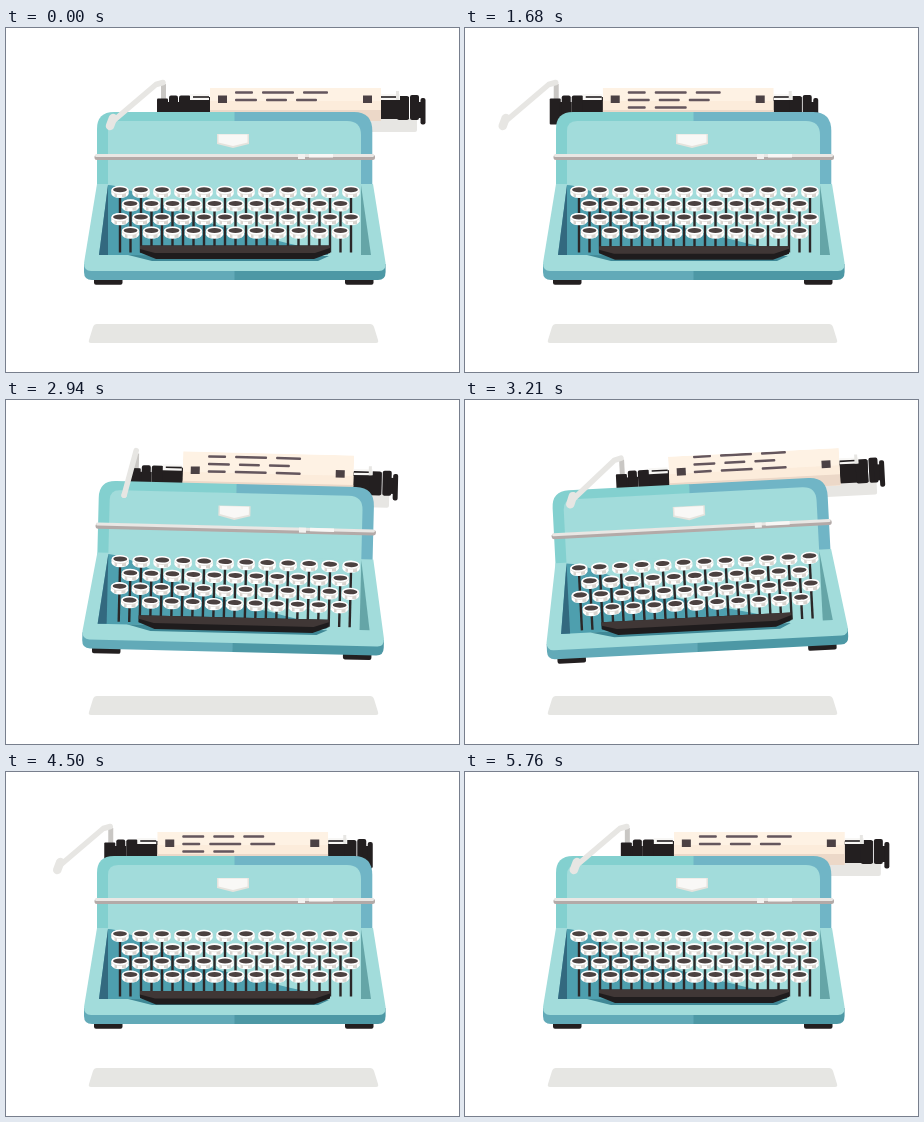
Write an HTML page with a canvas that moves like this. It is 453 px wide and 344 px high and loops after 5.91 s.

```html
<!DOCTYPE html>
<html lang="en">
<head>
<meta charset="utf-8">
<title>Typewriter</title>
<style>
html, body { margin: 0; width: 100%; height: 100%; overflow: hidden; background: #fff; }
canvas { display: block; width: 453px; height: 344px; }
</style>
</head>
<body>
<canvas id="stage" width="453" height="344"></canvas>
<script>
const c = document.getElementById('stage').getContext('2d');
const LOOP = 5910, STEP = 4.85, HOME = 204, STRIKE = 229;
const INK = '#231f20', LIGHT = '#a2dcdb', SILVER = '#e7e6e3';

// Two typed lines; words are measured from the paper's left edge
const LINES = [
  { start: 210, end: 2580, back: 2655, spend: 600, keys: 19, ease: 1.3, words: [[25, 43], [52, 84], [93, 118]] },
  { start: 3255, end: 5220, back: 5225, spend: 535, keys: 17, ease: 1, words: [[25, 47], [56, 77], [86, 107]] }
];

const mix = (a, b, k) => a + (b - a) * k;
const clamp = v => Math.max(0, Math.min(1, v));

function box(color, x, y, w, h, r = 0) {
  c.fillStyle = color;
  c.beginPath();
  c.roundRect(x, y, w, h, r);
  c.fill();
}
function shape(color, d) {
  c.fillStyle = color;
  c.fill(new Path2D(d));
}
function line(color, width, ...p) {
  c.strokeStyle = color;
  c.lineWidth = width;
  c.lineCap = c.lineJoin = 'round';
  c.beginPath();
  for (let i = 0; i < p.length; i += 2) c.lineTo(p[i], p[i + 1]);
  c.stroke();
}
function oval(color, x, y, rx, ry) {
  c.fillStyle = color;
  c.beginPath();
  c.ellipse(x, y, rx, ry, 0, 0, 7);
  c.fill();
}

function pose(t) {
  const index = t < LINES[1].start ? 0 : 1, l = LINES[index];

  // typing: one eased hop per key
  const n = l.keys * (1 - (1 - clamp((t - l.start) / (l.end - l.start))) ** l.ease);
  const f = n % 1;
  const head = HOME - STEP * (n - f + f * f * (3 - 2 * f));
  const typing = t > l.start && t < l.end;
  const reach = STRIKE - head;
  const space = !l.words.some(([a, b]) => reach >= a && reach <= b);

  // carriage return: swing the lever, feed the paper, slide back, rock the machine
  const u = clamp((t - l.back) / l.spend);
  const pull = clamp(u * 5);
  return {
    x: mix(head, HOME + STEP, clamp(u / .74)),
    row: index + 2,
    limit: t < l.end ? reach : 171,
    space,
    key: (Math.round(n) * 33 + 32) % 47,
    press: typing ? clamp(1.1 - 2 * Math.abs((f + .55) % 1 - .5)) : 0,
    bar: typing && !space ? clamp(1 - 4 * Math.abs(f - .65)) : 0,
    scroll: index + pull,
    rise: pull * clamp((1 - u) * 8),
    lever: Math.min(pull, clamp((.9 - u) * 5)),
    tilt: 4 * Math.sin(2 * Math.PI * clamp((u - .445) / .555))
  };
}

function paper(p) {
  const top = 60 - 7.5 * p.rise;
  c.save();
  c.beginPath();
  c.rect(0, top, 171, 93 - top);
  c.clip();
  box('#fef2e4', 0, top, 171, 41);
  box('#fcecdb', 0, 73, 171, 20);
  box('#ecd8c8', 0, 82, 171, 12);
  for (const x of [8, 153]) box('#4b4144', x, 67.5, 9, 7.5);
  for (let j = Math.floor(p.scroll) - 1; j <= p.row; j++) {
    const y = 64.6 + 7.5 * (j - p.scroll);
    const limit = j < p.row ? 171 : p.limit;
    for (const [a, b] of LINES[j & 1].words)
      if (limit > a) box('#64565d', a, y - 1.25, Math.min(b, limit) - a, 2.5, 1);
  }
  c.restore();
}

function carriage(p) {
  c.save();
  c.translate(p.x, 0);
  box(SILVER, -37, 90, 244, 14, 2);
  box('#c9c7c4', -49, 56, 5, 17);
  // left knobs
  box(INK, -53, 70.5, 11, 26, 1);
  box(INK, -43, 74, 12, 18);
  box(INK, -41, 67.5, 9, 31, 2);
  box(INK, -31, 67.5, 12, 24, 2);
  box(INK, -20, 69, 22, 22);
  // right knobs
  box(INK, 170, 69, 29, 22);
  box(INK, 187, 68, 12, 24, 2);
  box(INK, 200, 67, 9, 25, 2);
  box(INK, 205, 74, 8, 16);
  box(INK, 210.5, 70, 5, 26.5, 2);
  // paper rods
  for (const x of [-20, 171]) {
    box('#f8f7f5', x, 66, 19, 6);
    box(INK, x < 0 ? x + 3 : x, 68.2, 16, 1.6);
  }
  box(SILVER, 186, 63, 3, 9);
  paper(p);
  c.restore();
  if (p.bar) shape('#3a3033', `M214 86L228 ${86 - 8 * p.bar}L242 86Z`);
}

function lever({ x, lever: k }) {
  const ex = x + mix(-98, -58, k), ey = mix(94, 98, k);
  line(SILVER, 5.5, x - 47, mix(54.5, 53, k), x + mix(-54, -47, k), mix(56.5, 53, k), ex, ey);
  line(SILVER, mix(8.5, 5.5, k), ex + 1 - k, ey - 4 + 4 * k, ex - 2 + 2 * k, ey + 4 - 4 * k);
}

function body() {
  for (const x of [88, 339]) box(INK, x, 248, 28.5, 8.7, 2);
  shape('#83d0cf', 'M91 160V101Q91 84 108 84H229V160Z');
  shape('#70b5c6', 'M228.5 84H348Q366.3 84 366.3 103V160H228.5Z');
  shape(LIGHT, 'M102 160V103Q102 93 112 93H341Q355 93 355 107V160Z');
  // base front and rim
  shape('#62aab8', 'M78 236H229V252H86Q78 252 78 244Z');
  shape('#4d98a5', 'M228.5 236H379.6V244Q379.6 252 372 252H228.5Z');
  shape(LIGHT, 'M91 156H367L379.6 235Q380 243 373 243H85Q78 243 78 235Z');
  // key well
  shape('#4e9fae', 'M102 157C135 160 165 190 265 211Q300 220 322 223V227H93Z');
  shape('#33697f', 'M102 157V227H93Z');
  shape('#65a5a7', 'M355 157L365 227H355Z');
  // bar
  box('#b3aaa8', 88.5, 126.5, 280.5, 5.5, 2.5);
  box('#e9e7e4', 89, 126, 279, 3, 1.5);
  box('#f3f1ef', 292, 126, 7, 5);
  box('#f8f7f5', 303, 126, 24, 3.5);
  // blank plate
  shape('#e5e3dd', 'M211 106H243V116L227 120L211 116Z');
  shape('#f9f8f6', 'M212.5 106.5H241.5V114.5L227 118L212.5 114.5Z');
}

function keys(p) {
  for (let i = 0; i < 23; i++) {
    const top = i % 2 ? 178 : 165;
    box('#2b2728', 112.8 + 10.5 * i, top, 2.4, 224.5 - top);
  }
  let id = 0;
  for (let row = 0; row < 4; row++)
    for (let i = 0; i < 12 - row % 2; i++, id++) {
      const x = 114 + 10.5 * (row % 2) + 21 * i;
      const y = 163 + 13.6 * row + (id === p.key && !p.space ? 4 * p.press : 0);
      shape('#fff', `M${x - 8.7} ${y - 1}V${y + 3}Q${x - 7} ${y + 7} ${x} ${y + 7}T${x + 8.7} ${y + 3}V${y - 1}Z`);
      box('#d9d4cf', x - 5.5, y + 2, 2.5, 4);
      box('#d9d4cf', x + 2, y + 2, 4, 4);
      oval('#e3dfda', x, y - .7, 8.7, 4.4);
      oval('#fff', x, y - 1.2, 8.5, 4.1);
      oval('#4b4140', x, y - 1.2, 6.9, 2.5);
    }
  shape('#3f8896', 'M122 227L146 233H312L323 228Z');
  c.save();
  c.translate(0, p.space ? 2 * p.press : 0);
  shape('#1f1c1d', 'M134 217.5H324V225L308 231H150L134 224.5Z');
  shape('#403736', 'M134 217.5H324V220L309 225H149L134 221Z');
  c.restore();
}

function draw(now) {
  const p = pose(now % LOOP);
  box('#fff', 0, 0, 453, 344);
  shape('#e6e6e3', 'M91 296H364Q367 296 368 299L372 312Q373 315 370 315H85Q82 315 83 312L87 299Q88 296 91 296Z');
  c.save();
  c.translate(229, 170);
  c.rotate(p.tilt * Math.PI / 180);
  c.translate(-229, -170);
  carriage(p);
  body();
  keys(p);
  lever(p);
  c.restore();
}

const start = performance.now();
function tick() {
  draw(performance.now() - start);
  requestAnimationFrame(tick);
}
tick();
</script>
</body>
</html>
```
